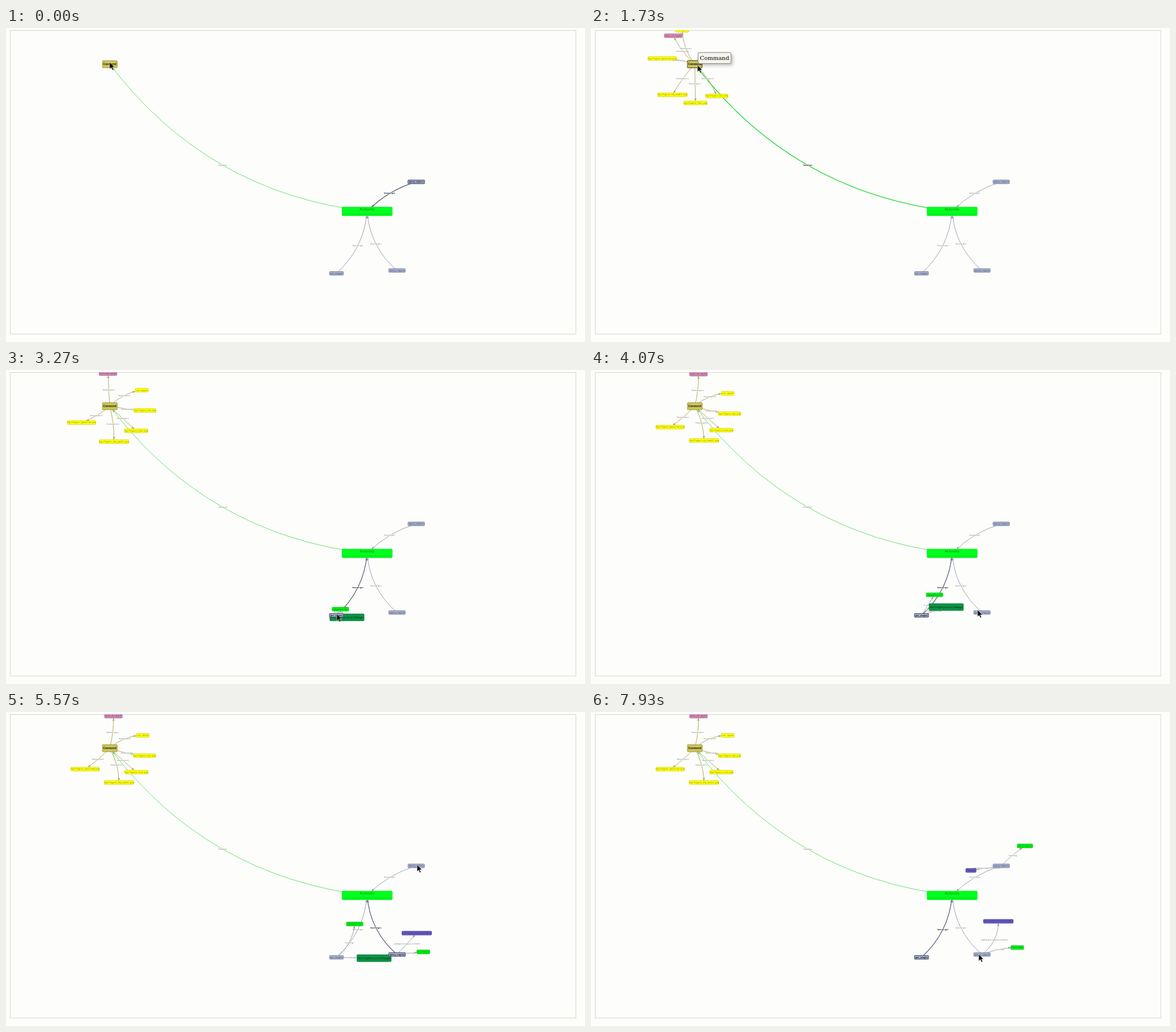
Recreate the animation shown at these times as an HTML page. Size 1017 by 551 pixels, loop 8000 ms.

```html
<!DOCTYPE html>
<html lang="en">
<head>
<meta charset="utf-8">
<title>Provenance graph</title>
<style>
html, body { margin: 0; width: 100%; height: 100%; overflow: hidden; background: #fdfefb; }
svg { display: block; }
text { font-family: "Liberation Mono", "DejaVu Sans Mono", monospace; text-anchor: middle; }
.label { font-size: 3.6px; paint-order: stroke; stroke: #fdfefb; stroke-width: .8px; }
#tip text { font: 10px "DejaVu Serif", serif; }
</style>
</head>
<body>
<svg width="1017" height="551" viewBox="0 0 1017 551">
  <defs>
    <clipPath id="frame"><rect x="7" y="4" width="995" height="534"/></clipPath>
    <filter id="shadow" x="-20%" y="-30%" width="150%" height="200%">
      <feDropShadow dx="3" dy="3" stdDeviation="2.5" flood-opacity=".22"/>
    </filter>
  </defs>
  <rect x="7.5" y="4.5" width="993.5" height="532.5" fill="none" stroke="#d2d6ca"/>
  <g clip-path="url(#frame)"><g id="edges"></g><g id="nodes"></g></g>
  <g id="tip">
    <rect x="188" y="43" width="58" height="19.5" rx="2.5" fill="#f5f4ed" stroke="#808074" filter="url(#shadow)"/>
    <text x="217" y="56.3">Command</text>
  </g>
  <path id="cursor" d="M0 0V12L2.8 9.6L5 14L7 13L4.9 8.8H8.5Z" fill="#111" stroke="#fff" stroke-width=".5"/>
</svg>
<script>
const LOOP = 8000;
const $ = id => document.getElementById(id);
const lerp = (a, b, k) => a + (b - a) * k;
const smooth = k => k * k * (3 - 2 * k);
const within = (spans, t) => spans.some(([a, b]) => t >= a && t < b);

function make(tag, parent, attrs = {}, text = "") {
  const el = document.createElementNS("http://www.w3.org/2000/svg", tag);
  set(el, attrs);
  el.textContent = text;
  parent.appendChild(el);
  return el;
}
function set(el, attrs) {
  for (const name in attrs) el.setAttribute(name, attrs[name]);
}

const STYLES = {
  command: { fill: "#cbc45a", stroke: "#9d923c", ink: "#222200" },
  activity: { fill: "#00ff1e", stroke: "#00ed1c", ink: "#045c0a" },
  entry: { fill: "#a5adcb", stroke: "#78819f", ink: "#3e4560" },
  file: { fill: "#ffff00", stroke: "#d6d62a", ink: "#7d7d14" },
  notebook: { fill: "#d48bb6", stroke: "#a5698d", ink: "#683d58" },
  service: { fill: "#00f514", stroke: "#00b818", ink: "#056c10" },
  table: { fill: "#655dc6", stroke: "#4c4599", ink: "#2b2670" },
  image: { fill: "#0b9546", stroke: "#087337", ink: "#03300f" }
};

const nodes = [], edges = [];

function node(text, style, x, y, w, h, extra = {}) {
  const n = { text, style: STYLES[style], x, y, w, h, size: 3.6, selected: [], life: [[0, LOOP]], ...extra };
  nodes.push(n);
  return n;
}
function edge(from, to, text, color, owner, bow = 0) {
  edges.push({ from, to, text, color, owner, bow });
}
// Each key of a moving node: time, x, y, bow of its edge.
function child(parent, text, style, w, birth, death, label, keys, big) {
  const n = node(text, style, 0, 0, w, big ? 12 : 6.6, { parent, life: [[birth, death]], size: big ? 5.3 : 3.6 });
  const [, x, y, bow] = keys[0];
  n.keys = [[birth, lerp(parent.x, x, .3), lerp(parent.y, y, .3), bow], ...keys];
  edge(parent, n, label, parent.style === STYLES.command ? "#aaa052" : "#9096aa", null);
  return n;
}

const command = node("Command", "command", 182.3, 63.5, 26, 12.5, { size: 5.5, bold: true, selected: [[370, 3200]] });
const activity = node("Activity", "activity", 634.3, 321.8, 88, 15, { size: 5.3 });
const images = node("get_images", "entry", 580.5, 430.5, 24.5, 6.4, { selected: [[3200, 4300], [7400, LOOP]] });
const region = node("query_region", "entry", 686.8, 425.5, 29, 6.4, { selected: [[4300, 5750]] });
const object = node("query_object", "entry", 720.6, 270, 29, 6.4, { selected: [[0, 630], [5750, 7400]] });

edge(activity, command, "hasPlan", "#55d962", command, 55.5);
edge(object, activity, "hasTarget", "#9096aa", object, -6.6);
edge(images, activity, "hasTarget", "#9096aa", images, -12);
edge(region, activity, "hasTarget", "#9096aa", region, 12);

const output = (text, style, w, ...keys) =>
  child(command, text, style, w, 650, LOOP, "hasOutputs", keys);
output("main_nb.ipynb", "notebook", 31, [1400, 108, 47, 3], [1730, 144.5, 13.5, 3], [2570, 168, 7, 3], [3900, 188.7, 7.2, -2]);
output("cat.ipynb", "file", 23, [1400, 138, 42, 5], [1730, 160, 4, 5], [2570, 236, 29, 5], [3900, 240, 41, 6]);
output("fgs/figure_spectrum.png", "file", 50, [1000, 92, 80, 0], [1730, 125, 53.5, -2], [2570, 127, 81.5, 4], [3900, 139, 100.3, 1.5]);
output("fgs/figure_sky_model.png", "file", 52, [1730, 143, 117.3, -2], [2570, 179, 126.3, 0], [3900, 198.5, 123.7, 4]);
output("fgs/figure_line.png", "file", 41, [1730, 183.5, 131.5, 0], [2570, 228, 108, 0], [3900, 229, 105.5, -.5]);
output("fgs/figure_sky.png", "file", 39, [1730, 221, 119.3, 4], [2570, 244, 64.5, 0], [3900, 243.3, 76.5, -2]);

child(images, "ImageService", "service", 29, 3250, 7450, "isUsing", [[4070, 603.5, 394.5, 0], [5200, 612.5, 372, -7]]);
child(images, "AstrophysicalImage", "image", 60, 3250, 7450, "isRequesting",
  [[3550, 640, 442, 0], [4070, 624, 416, 0], [5200, 646.5, 432, 0]], true);
child(region, "AstrophysicalCatalogRow", "table", 52, 4500, LOOP, "isRequestingAstroTable",
  [[4900, 765, 400, 0], [5570, 721.5, 388, 0], [6500, 715.5, 367.3, -8]]);
child(region, "Catalogue", "service", 22.5, 4500, LOOP, "isUsing",
  [[4900, 742, 428, 0], [5570, 733, 421, 0], [6500, 748.7, 413.3, 3]]);
child(object, "ObjectQuery", "service", 27, 5850, LOOP, "isUsing",
  [[6630, 711.5, 202.7, 0], [6950, 723, 188, 0], [7900, 762.3, 235, 1.5]]);
child(object, "objName", "table", 18, 5850, LOOP, "isRequestingAstroTable",
  [[6630, 677.7, 217.2, 0], [7900, 667.3, 278, 0]]);

const cursorKeys = [
  [0, 182, 60], [70, 181, 58.5], [630, 182, 60], [1000, 187, 65], [1950, 187, 65], [2270, 586, 361],
  [2570, 590, 425], [2850, 581, 428], [3500, 581, 428], [3900, 679, 421], [4950, 679, 421], [5450, 722, 268],
  [5950, 722, 268], [6500, 651, 446], [6950, 651, 446], [7270, 600, 432], [7380, 581, 429],
  [7550, 581, 429], [7900, 681, 425]
];

// Key pair around t with the eased share between them.
function segment(keys, t) {
  let i = 0;
  while (i < keys.length - 2 && t >= keys[i + 1][0]) i++;
  const a = keys[i], b = keys[i + 1];
  return [a, b, smooth(Math.max(0, Math.min(1, (t - a[0]) / (b[0] - a[0]))))];
}

// Children swing around their parent, so radius and angle are eased.
function moveNode(n, t) {
  const [a, b, k] = segment(n.keys, t);
  const polar = p => [Math.hypot(p[1] - n.parent.x, p[2] - n.parent.y), Math.atan2(p[2] - n.parent.y, p[1] - n.parent.x)];
  const [ra, aa] = polar(a), [rb, ab] = polar(b);
  const turn = Math.atan2(Math.sin(ab - aa), Math.cos(ab - aa));
  const r = lerp(ra, rb, k), angle = aa + turn * k;
  n.x = n.parent.x + r * Math.cos(angle);
  n.y = n.parent.y + r * Math.sin(angle);
  n.bow = lerp(a[3], b[3], k);
}

function drawEdge(e, t) {
  const { from, to } = e, visible = within(to.life, t);
  e.g.style.display = visible ? "" : "none";
  if (!visible) return;
  const dx = to.x - from.x, dy = to.y - from.y, len = Math.hypot(dx, dy) || 1;
  const bow = to.keys ? to.bow : e.bow;
  const mx = (from.x + to.x) / 2, my = (from.y + to.y) / 2;
  const px = dy / len * bow, py = -dx / len * bow;
  const cx = mx + 2 * px, cy = my + 2 * py;
  const at = k => [from.x, from.y].map((v, i) =>
    (1 - k) ** 2 * v + 2 * k * (1 - k) * [cx, cy][i] + k * k * [to.x, to.y][i]);
  let lo = 0, hi = 1;
  for (let i = 0; i < 14; i++) {
    const k = (lo + hi) / 2, [x, y] = at(k);
    if (Math.abs(x - to.x) < to.w / 2 && Math.abs(y - to.y) < to.h / 2) hi = k; else lo = k;
  }
  const [x, y] = at(lo);
  const angle = Math.atan2(lerp(cy - from.y, to.y - cy, lo), lerp(cx - from.x, to.x - cx, lo));
  const on = e.owner && within(e.owner.selected, t);
  const color = on ? (e.owner === command ? "#32d644" : "#666b80") : e.color;
  set(e.line, { d: `M${from.x} ${from.y}Q${cx} ${cy} ${to.x} ${to.y}`, stroke: color, "stroke-width": on ? 1.4 : .9 });
  set(e.arrow, { transform: `translate(${x} ${y}) rotate(${angle * 180 / Math.PI})`, fill: color });
  set(e.label, { x: mx + px, y: my + py + 1.2, fill: on ? "#111" : "#777", "font-weight": on ? 700 : 400 });
}

function drawNode(n, t) {
  const visible = within(n.life, t);
  n.g.style.display = visible ? "" : "none";
  if (!visible) return;
  const on = within(n.selected, t);
  set(n.g, { transform: `translate(${n.x} ${n.y})` });
  set(n.box, { stroke: on ? (n === command ? "#77692c" : "#4f5870") : n.style.stroke, "stroke-width": on ? 1.3 : .9 });
  set(n.label, { "font-weight": on || n.bold ? 700 : 400, fill: on ? "#111" : n.style.ink });
}

for (const e of edges) {
  e.g = make("g", $("edges"));
  e.line = make("path", e.g, { fill: "none" });
  e.arrow = make("path", e.g, { d: "M0 0L-5 -2L-4 0L-5 2Z" });
  e.label = make("text", e.g, { class: "label" }, e.text);
}
for (const n of [...nodes.filter(n => n.keys), ...nodes.filter(n => !n.keys)]) {
  n.g = make("g", $("nodes"));
  n.box = make("rect", n.g, { x: -n.w / 2, y: -n.h / 2, width: n.w, height: n.h, rx: 1.2, fill: n.style.fill });
  n.label = make("text", n.g, { y: n === activity ? -2 : n.size * .3, "font-size": n.size }, n.text);
  if (n === activity)
    make("path", n.g, { d: "M-42 4.8H42", stroke: "#07a517", "stroke-width": .9, "stroke-dasharray": "1.2 1.3" });
}

function render(t) {
  nodes.filter(n => n.keys).forEach(n => moveNode(n, t));
  edges.forEach(e => drawEdge(e, t));
  nodes.forEach(n => drawNode(n, t));
  $("tip").style.display = t >= 1470 && t < 2000 ? "" : "none";
  const [a, b, k] = segment(cursorKeys, t);
  set($("cursor"), { transform: `translate(${lerp(a[1], b[1], k)} ${lerp(a[2], b[2], k)})` });
}

const start = performance.now();
function tick() {
  render((performance.now() - start) % LOOP);
  requestAnimationFrame(tick);
}
tick();
</script>
</body>
</html>
```
